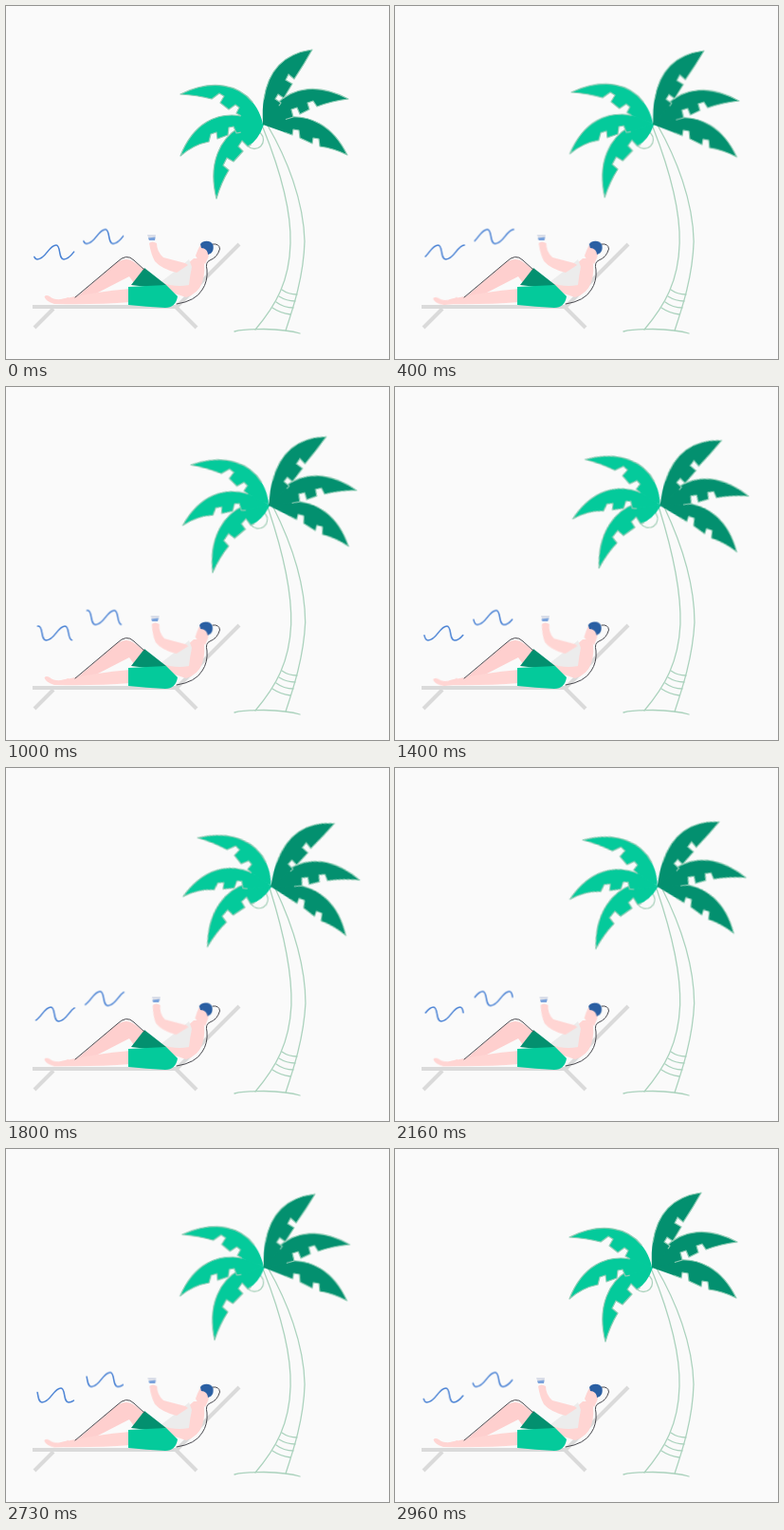
These frames come from a looping animation (404 by 372 pixels, 3 s). An HTML page:

```html
<!DOCTYPE html>
<html lang="en">
<head>
<meta charset="utf-8">
<title>Beach rest</title>
<style>
  html, body { margin: 0; width: 100%; height: 100%; overflow: hidden; background: #fafafa; }
  svg { display: block; width: 404px; height: 372px; }

  .line { fill: none; stroke: #abd2bd; stroke-width: 1.3; stroke-linecap: round; }
  .skin { fill: #ffd5d3; }
  .shade { fill: #fecfce; }
  .ink { fill: none; stroke: #4a4a50; stroke-width: 1; stroke-linecap: round; }
  .chair { fill: none; stroke: #dadada; stroke-width: 4; }
  .dark { fill: #03906f; }
  .light { fill: #04ca9b; }

  /* Palm */
  .crown, .trunk-l, .trunk-r, .arm, .head { animation: 3s cubic-bezier(.37, 0, .63, 1) infinite; }
  .crown { animation-name: drift; }
  .trunk-l { animation-name: bend-l; }
  .trunk-r { animation-name: bend-r; }
  .leaf {
    --a: 13.6deg;
    transform-origin: 271px 124px;
    animation: fan 3s cubic-bezier(.37, 0, .63, 1) infinite;
  }
  /* Outlines stop short of the crown, where the leaves merge */
  path.leaf {
    stroke: #8ccbb3; stroke-width: 1.2; stroke-linejoin: round;
    stroke-dasharray: 0 11 78 11;
  }
  @keyframes drift { 53% { transform: translateX(9px); } }
  @keyframes fan { 63.3% { transform: rotate(var(--a)); } }
  @keyframes bend-l {
    0%, 100% { d: path("M271 128C288 170 301 215 300 250C299 290 285 315 263 341"); }
    53% { d: path("M279 128C292 170 302 215 301 250C299 290 285 315 263 341"); }
  }
  @keyframes bend-r {
    0%, 100% { d: path("M276 126C296 160 314 205 315 248C314 285 303 318 295 342"); }
    53% { d: path("M284 126C300 160 316 205 316 248C314 285 303 318 295 342"); }
  }

  /* Person */
  .arm { transform-origin: 185px 277px; animation-name: lean; }
  .head { transform-origin: 206px 270px; animation-name: nod; }
  .foot { transform-origin: 62px 311px; animation: tap 1s cubic-bezier(.37, 0, .63, 1) infinite; }
  @keyframes lean { 53% { transform: skewX(-8.4deg); } }
  @keyframes nod { 53% { transform: rotate(-4deg); } }
  @keyframes tap { 45% { transform: rotate(-6deg); } }

  /* The wave slides left while its visible stretch runs along the path */
  .wave {
    d: path("M5 267c9 0 12-15 20-15c5 0 2 15 8 15c9 0 12-15 20-15c5 0 2 15 8 15c9 0 12-15 20-15c5 0 2 15 8 15c9 0 12-15 20-15c5 0 2 15 8 15");
    fill: none; stroke: #4a82d4; stroke-width: 1.5; stroke-linecap: round;
    stroke-dasharray: 141 1000;
    animation: flow 1.5s linear infinite;
  }
  @keyframes flow {
    from { stroke-dashoffset: -90; transform: translateX(0); }
    to { stroke-dashoffset: -190; transform: translateX(-28px); }
  }
</style>
</head>
<body>
<svg viewBox="0 0 404 372">
  <path class="wave" pathLength="400"/>
  <g transform="translate(52 -16.5)"><path class="wave" pathLength="400"/></g>

  <g>
    <path class="line" d="M241 343C252 340 262 341 272 340.5C288 341 300 342 310 345"/>
    <path class="line" d="M291 299Q298 304 307 304M288 306Q296 311 305 311M285 312Q293 318 303 318M281 318Q290 324 300 325"/>
    <path class="line trunk-l" d="M271 128C288 170 301 215 300 250C299 290 285 315 263 341"/>
    <path class="line trunk-r" d="M276 126C296 160 314 205 315 248C314 285 303 318 295 342"/>
    <g class="crown">
      <g class="leaf"><circle class="line" cx="262" cy="141" r="9.5"/></g>
      <path class="leaf light" style="--a:14.4deg" pathLength="100"
        d="M271 124L253 125C231 133 211 160 222 203Q227 186 235 173L229 168L233 160L240 164L250 153L245 148L249 142L255 148Q266 142 272 125Z"/>
      <path class="leaf light" style="--a:14.4deg" pathLength="100"
        d="M271 124C240 107 202 112 184 158Q198 146 214 143L216 135L222 133L223 140L234 136L235 128L240 127L243 134Q256 132 271 124Z"/>
      <path class="leaf light" pathLength="100"
        d="M271 124C264 92 231 70 184 93Q202 94 217 98L225 92L230 95L226 102L235 109L242 104L246 107L243 113Q256 121 271 124Z"/>
      <path class="leaf dark" style="--a:13.4deg" pathLength="100"
        d="M271 124C305 109 340 116 360 157Q346 150 331 148L330 140L324 139L323 145L310 139L309 131L303 130L302 136Q288 131 271 125Z"/>
      <path class="leaf dark" style="--a:12.6deg" pathLength="100"
        d="M271 124C287 90 320 76 361 98Q344 100 328 106L324 100L318 102L320 109L310 114L307 107L301 109L303 117Q288 122 271 125Z"/>
      <path class="leaf dark" style="--a:12deg" pathLength="100"
        d="M271 124C269 88 279 52 323 46Q314 62 304 77L298 72L295 78L302 82L293 97L287 93L284 98L290 102Q283 113 272 124Z"/>
    </g>
  </g>

  <path class="chair" d="M181 316L246 251M28 317H182M50 319L30 339M179 317L201 339"/>

  <g>
    <path class="shade" d="M74 307L116 271Q127 263 137 271L148 280L135 292L130 285L97 302Q84 310 74 307Z"/>
    <path class="skin" d="M58 309Q95 301 131 298V312Q95 315 52 314Z"/>
    <path class="skin foot" d="M66 307Q53 312 46 306Q42 304 40.5 306.5Q42 311 51 314H66Z"/>
    <path class="skin" d="M198 266L208 266Q211 279 207 291Q203 303 190 307L178 303L163 293L190 273Z"/>
    <path fill="#ececec" d="M193 267L196 275Q194 284 193 294Q178 297 163 291L180 278Z"/>
    <path class="dark" d="M146 276L169 294L157 297L132 294Z"/>
    <path class="light" d="M129 296L169 294L181 306Q179 318 168 318Q148 317 129 315Z"/>
    <path class="ink" d="M73 307L117 270Q127 260 135 268L146 278"/>
    <path class="ink" d="M218 251Q225 250 225.5 256Q223 265 215 268Q210 270 212 278Q213 290 207 299Q200 311 180 314"/>

    <g class="arm">
      <path class="skin" d="M151 250Q154 247 159 250Q159 259 166 265L189 271L192 273L180 281Q164 277 157 269Q153 262 151 250Z"/>
      <path fill="#d9dde8" d="M149 241H158L157 247H151Z"/>
      <path fill="#7ba3dc" d="M150 244.5L157.5 243.5L157 247H151Z"/>
    </g>

    <g class="head">
      <path class="skin" d="M205 252Q202 257 200 263Q201 267 206 268L210 272Q214 265 215 258Z"/>
      <path fill="#2a5fa3" d="M205 251C208 246 217 247 218.5 252C219.500 258 217 261 213 262C213 258 210 255 206 255Z"/>
    </g>
  </g>
</svg>
</body>
</html>
```
